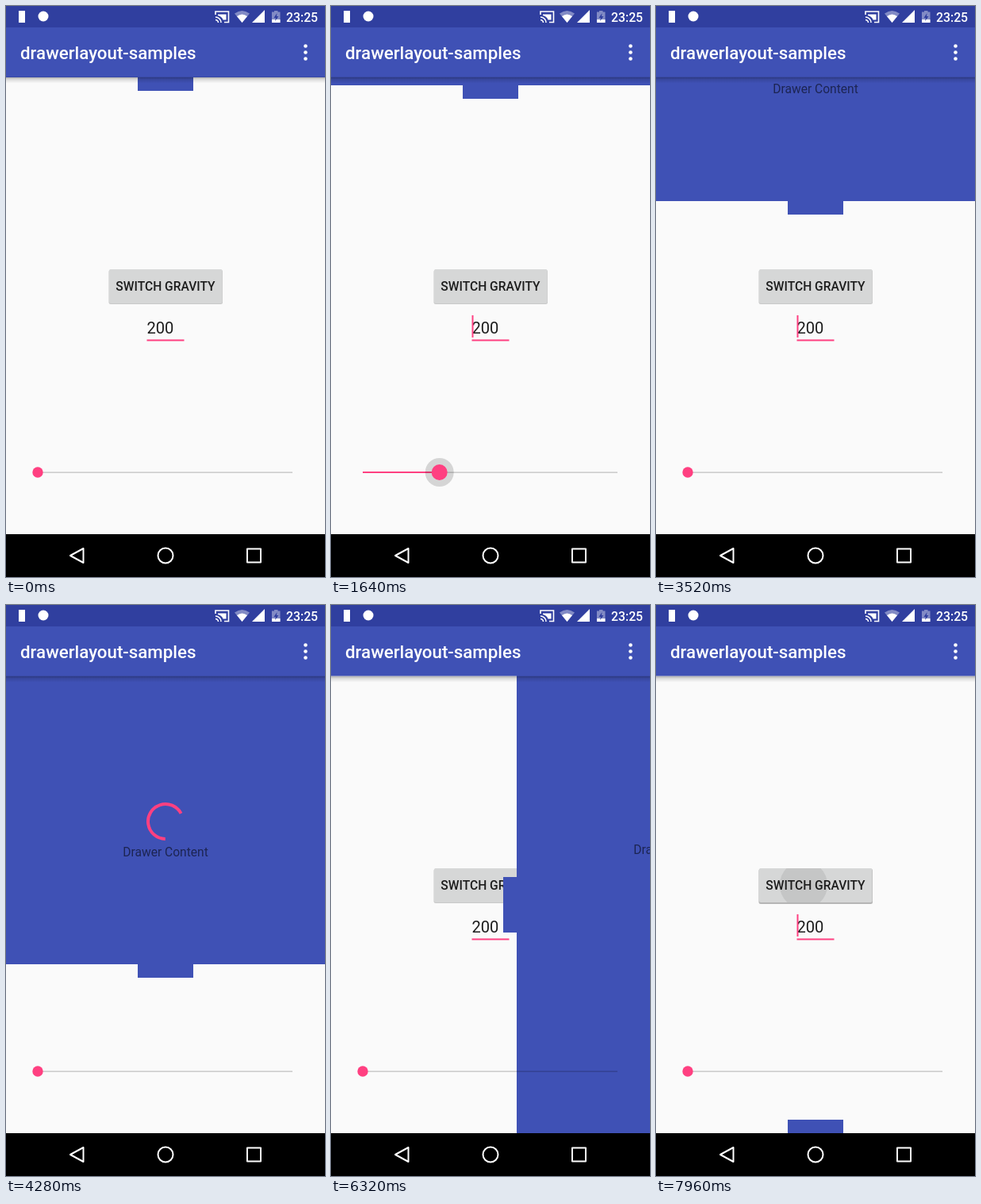
Write an HTML page that moves like this. It is 402 px wide and 720 px high and loops after 8000 ms.

```html
<!DOCTYPE html>
<html lang="en">
<head>
<meta charset="utf-8">
<title>Drawer layout demo</title>
<style>
  :root { --primary: #3f51b5; --dark: #303f9f; --accent: #ff4081; }
  html, body { margin: 0; width: 100%; height: 100%; overflow: hidden; background: #000; }
  svg { display: block; width: 402px; height: 720px; font-family: Roboto, sans-serif; }
  .medium { font-weight: 500; }
  .light { fill: #fff; }
  .primary { fill: var(--primary); }
  .accent { fill: var(--accent); }
  .nav { fill: none; stroke: #fff; stroke-width: 2; stroke-linejoin: round; }
</style>
</head>
<body>
<svg viewBox="0 0 402 720" xmlns="http://www.w3.org/2000/svg">
  <defs>
    <clipPath id="page"><rect y="89" width="402" height="577"/></clipPath>
    <clipPath id="buttonClip"><rect x="130" y="332" width="142.5" height="43" rx="2"/></clipPath>
    <linearGradient id="fade" x2="0" y2="1">
      <stop offset="0" stop-color="#000" stop-opacity=".32"/>
      <stop offset=".4" stop-color="#000" stop-opacity=".12"/>
      <stop offset="1" stop-color="#000" stop-opacity="0"/>
    </linearGradient>
  </defs>

  <rect width="402" height="720" fill="#fafafa"/>

  <g id="main">
    <rect id="lift" x="129.5" y="332.5" width="143.5" height="43.5" rx="2.5" fill="#000"/>
    <rect x="130" y="332" width="142.5" height="43" rx="2" fill="#d6d7d7"/>
    <circle id="ripple" cx="186" cy="353" fill="#000" clip-path="url(#buttonClip)"/>
    <text class="medium" x="201" y="358.7" font-size="15.6" text-anchor="middle" fill="#1c1c1c">SWITCH GRAVITY</text>
    <text x="177.5" y="412.8" font-size="20.1" fill="#1c1c1c">200</text>
    <rect class="accent" x="177.5" y="420.5" width="47" height="2"/>
    <rect class="accent" id="cursor" x="177.5" y="390" width="2" height="28"/>
  </g>

  <g clip-path="url(#page)">
    <path id="drawer" class="primary"/>
    <g id="content">
      <path id="spinner" fill="none" stroke="var(--accent)" stroke-width="4"/>
      <text y="44" font-size="15.6" text-anchor="middle" fill="#1d2553">Drawer Content</text>
    </g>
  </g>

  <rect x="40" y="587.4" width="321" height="1.5" fill="#000" opacity=".2"/>
  <rect class="accent" id="progress" x="40" y="587" height="2"/>
  <circle id="halo" cy="588" fill="#000" opacity=".15"/>
  <circle class="accent" id="thumb" cy="588"/>

  <rect y="89.5" width="402" height="8" fill="url(#fade)"/>
  <rect class="primary" width="402" height="89.5"/>
  <rect width="402" height="27" fill="var(--dark)"/>
  <text class="medium light" x="18" y="67" font-size="22.3">drawerlayout-samples</text>
  <g class="light">
    <circle cx="377.5" cy="50.5" r="2.3"/>
    <circle cx="377.5" cy="58.5" r="2.3"/>
    <circle cx="377.5" cy="66.5" r="2.3"/>
    <rect x="16" y="6" width="8" height="15"/>
    <circle cx="47" cy="13" r="6.5"/>
    <path d="M310 21L326 5V21Z"/>
    <path d="M297.500 21L288 9.500Q297.500 2.500 307 9.500Z" opacity=".4"/>
    <path d="M297.500 21L291 13Q297.500 8 304 13Z"/>
    <path d="M335 7.500H338V6H342.500V7.500H345.500V21H335Z" opacity=".4"/>
    <rect x="335" y="17" width="10.500" height="4"/>
    <path d="M341.500 9L337.500 15H340L339 19L343.500 13H341Z" fill="var(--dark)"/>
    <path d="M267 10.500H277.500V17.500H273.500Q272 13 267 12Z"/>
    <text class="medium" x="353" y="19.700" font-size="15.8">23:25</text>
  </g>
  <path d="M264 11V7H280.500V20.500H275M264 14A7 7 0 0 1 271 21M264 17.500A3.500 3.500 0 0 1 267.500 21"
    fill="none" stroke="#fff" stroke-width="1.6"/>

  <rect y="666" width="402" height="54" fill="#000"/>
  <g class="nav">
    <path d="M81 693L97.500 684V702Z"/>
    <circle cx="201" cy="693" r="9.500"/>
    <rect x="304" y="684.500" width="17" height="17"/>
  </g>
</svg>
<script>
const LOOP = 8000, TOP = 90, BOTTOM = 666, WIDTH = 402, TOP_OPEN = 363, HANDLE = 17;
const $ = id => document.getElementById(id);
const set = (id, attrs) => {
  for (const key in attrs) $(id).setAttribute(key, attrs[key]);
};
const clamp = v => Math.max(0, Math.min(1, v));
const ramp = (t, from, to) => clamp((t - from) / (to - from));
const ease = u => u * u * (3 - 2 * u);

// Linear track through [time, value] pairs
function track(t, keys) {
  if (t <= keys[0][0]) return keys[0][1];
  for (let i = 1; i < keys.length; i++) {
    const [t0, a] = keys[i - 1], [t1, b] = keys[i];
    if (t <= t1) return a + (b - a) * (t - t0) / (t1 - t0);
  }
  return keys[keys.length - 1][1];
}

const SEEK = [[160, 0], [500, .45], [900, .95], [1200, .85], [1640, .302], [2000, .03], [2150, 0]];
const TOP_DRAG = [[3380, 0], [3520, 155], [3680, 295], [3800, 345], [3900, 363],
  [4520, 363], [4640, 320], [4800, 190], [4960, 35], [5030, 0]];
const SIDE_DRAG = [[6080, 0], [6200, 55], [6320, 167], [6480, 325], [6640, 385],
  [7180, 385], [7280, 300], [7420, 85], [7520, 0]];
const PRESSES = [5380, 7840];
const TO_RIGHT = 5500, TO_BOTTOM = 7920;

function drawSlider(t, p) {
  const x = 40 + 321 * p;
  const press = ramp(t, 100, 220) * (1 - ramp(t, 2300, 2420));
  set('progress', { width: 321 * p });
  set('thumb', { cx: x, r: 6.7 + 3.3 * press });
  set('halo', { cx: x, r: 18 * press });
}

function drawDrawer(t, p) {
  if (t < TO_RIGHT) {
    const edge = TOP + (t < 2600 ? TOP_OPEN * p ** 3 : track(t, TOP_DRAG));
    set('drawer', { d: `M0 ${edge - 400}H402V${edge}H236V${edge + HANDLE}H166V${edge}H0Z` });
    set('content', { transform: `translate(201 ${edge - 180})` });
  } else if (t < TO_BOTTOM) {
    const edge = WIDTH - track(t, SIDE_DRAG);
    set('drawer', { d: `M${edge} 88V343H${edge - HANDLE}V413H${edge}V668H830V88Z` });
    set('content', { transform: `translate(${edge + 201} 270)` });
  } else {
    set('drawer', { d: `M166 ${BOTTOM - HANDLE}H236V668H166Z` });
    set('content', { transform: 'translate(201 800)' });
  }
}

function drawSpinner(t) {
  const phase = (t - 7080) / 1333 + 6.5, f = phase % 1;
  const head = .75 * ease(clamp(2 * f)), tail = .75 * ease(clamp(2 * f - 1));
  const start = -75 + 360 * (tail + f / 4) + 144 * (phase - 6);
  const sweep = Math.max(4, 360 * (head - tail));
  const point = deg => {
    const a = deg * Math.PI / 180;
    return `${22 * Math.cos(a)} ${22 * Math.sin(a)}`;
  };
  set('spinner', { d: `M${point(start)}A22 22 0 ${sweep > 180 ? 1 : 0} 1 ${point(start + sweep)}` });
}

function drawButton(t) {
  const since = PRESSES.map(at => t - at).find(d => d >= 0 && d < 400);
  const active = since !== undefined;
  const fade = active ? 1 - ramp(since, 180, 400) : 0;
  set('ripple', { r: active ? 10 + since / 6 : 0, opacity: .08 * fade });
  set('lift', { height: 43.5 + fade, opacity: .2 + .08 * fade });
}

function render(t) {
  const p = track(t, SEEK);
  drawSlider(t, p);
  drawDrawer(t, p);
  drawSpinner(t);
  drawButton(t);
  set('cursor', { opacity: t % 1000 >= 500 ? 1 : 0 });
}

function tick() {
  render(performance.now() % LOOP);
  requestAnimationFrame(tick);
}
render(0);
tick();
</script>
</body>
</html>
```
